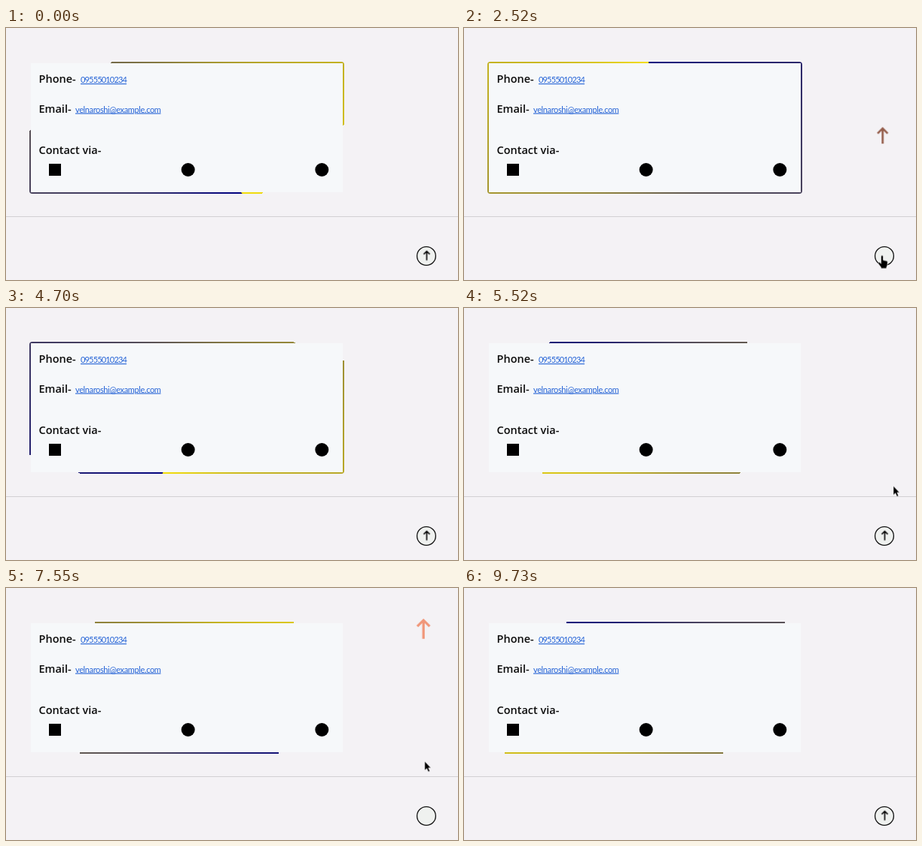
Write an HTML page that moves like this. It is 600 px wide and 336 px high and loops after 9760 ms.

```html
<!DOCTYPE html>
<html lang="en">
<head>
<meta charset="utf-8">
<title>Contact card</title>
<style>
  html, body { margin: 0; width: 100%; height: 100%; overflow: hidden; background: #f4f2f5; }
  #stage { position: absolute; left: 0; top: 0; width: 600px; height: 336px; overflow: hidden; }
  .card { position: absolute; left: 31px; top: 45px; width: 418px; height: 175.5px; border-radius: 4px; overflow: hidden; }
  .glow {
    position: absolute; left: 50%; top: 50%; width: 624px; height: 262px; margin: -131px 0 0 -312px;
    background: conic-gradient(#000080, #f4de0a);
  }
  .face { position: absolute; inset: 2px; background: #f6f8fa; }
  svg { position: absolute; left: 0; top: 0; }
  .label { font: 600 14.5px "Open Sans", "Noto Sans", sans-serif; fill: #0c0c0c; }
  .link { font: 400 11px Lato, sans-serif; fill: #2563d6; text-decoration: underline; }
  #arrow { color: #000; }
</style>
</head>
<body>
<div id="stage">
  <div class="card"><div class="glow" id="glow"></div><div class="face"></div></div>
  <svg width="600" height="336" viewBox="0 0 600 336">
    <g class="label">
      <text x="43.5" y="73">Phone-</text>
      <text x="43.5" y="112.5">Email-</text>
      <text x="43.5" y="167.5">Contact via-</text>
    </g>
    <g class="link">
      <text x="99" y="73" letter-spacing="-.83">09555010234</text>
      <text x="92" y="112.5" letter-spacing="-.37">velnaroshi@example.com</text>
    </g>
    <rect x="57" y="181" width="16" height="16"/>
    <circle cx="241.7" cy="189" r="9"/>
    <circle cx="419.3" cy="189" r="9"/>
    <rect y="251" width="600" height="1" fill="#d2d0d3"/>
    <circle cx="558" cy="304" r="12.4" fill="#eff1ef" stroke="#111" stroke-width="1.3"/>
    <g id="arrow" fill="none" stroke="currentColor" stroke-width="1.6">
      <path d="M0 6.5V-5.4M-4 -1.6L0 -5.6L4 -1.6"/>
    </g>
    <g id="cursor" stroke="#fff" stroke-width=".5">
      <path id="pointer" d="M0 0V12L2.7 9.5L4.8 14L6.8 13L4.8 8.8H8.2Z"/>
      <path id="hand" d="M-1.4 1.2a1.4 1.4 0 0 1 2.8 0V6l5 1.2q1 .3 .9 1.6l-.5 4.2q-.2 1.5-1 2.4v1.6H-1.4v-1.4L-4.8 11q-.8-1.2 .2-1.9 1-.5 2 .5l1.2 1.1z"/>
    </g>
  </svg>
</div>
<script>
const LOOP = 9760;
const $ = id => document.getElementById(id);

// rows: [time in ms, value, easing to the next row]
function play(id, prop, rows, format = v => v) {
  const frames = rows.map(([t, v, easing = 'linear']) =>
    ({ offset: t / LOOP, [prop]: format(v), easing }));
  $(id).animate(frames, { duration: LOOP, iterations: Infinity }).startTime = 0;
}

const HOLD = 'step-end', EASE = 'ease-in-out';

play('glow', 'transform', [
  [0, 140], [2520, 363.3], [3940, 492.5], [5520, 633],
  [6640, 735.4], [8550, 905.9], [9730, 1015.2], [LOOP, 1018]
], a => `rotate(${a}deg)`);

// Height of the arrow: 0 in the button, 1 at the top
play('arrow', 'transform', [
  [0, 0], [1950, 0, EASE], [2950, 1], [3510, 1, EASE], [4490, 0],
  [5680, 0, EASE], [6660, 1], [7420, 1, EASE], [8420, 0], [LOOP, 0]
], p => `translate(${558.5 - 4.5 * p}px, ${303.3 - 257.8 * p}px) scale(${1 + 1.08 * p})`);

const BLACK = '#000', CORAL = '#f0977a';
play('arrow', 'color', [
  [0, BLACK], [1950, BLACK, EASE], [2950, CORAL], [4330, CORAL], [4490, BLACK],
  [5680, BLACK, EASE], [6500, CORAL], [8260, CORAL], [8420, BLACK], [LOOP, BLACK]
]);

play('cursor', 'transform', [
  [0, [550, -20]], [350, [550, -20], EASE], [900, [555, 299]],
  [1400, [555, 299], EASE], [1700, [556, 301]], [2050, [556, 301], EASE], [2250, [555, 303.5]],
  [3430, [555, 303.5], 'ease-in'], [3620, [553, 255]], [3940, [544, 64]], [4000, [543, 22]], [4060, [542, -20]],
  [5100, [562, -20]], [5380, [573, 150]], [5520, [570, 237]], [5680, [563, 292], 'ease-out'], [5900, [559, 306.5]],
  [7350, [559, 306.5], 'ease-in'], [7500, [557, 270]], [7880, [548, -20]], [LOOP, [550, -20]]
], ([x, y]) => `translate(${x}px, ${y}px)`);

const overButton = [[0, 0], [850, 1], [3510, 0], [5670, 1], [7420, 0], [LOOP, 0]];
const steps = overButton.map(([t, v]) => [t, v, HOLD]);
play('hand', 'opacity', steps);
play('pointer', 'opacity', steps, v => 1 - v);
</script>
</body>
</html>
```
